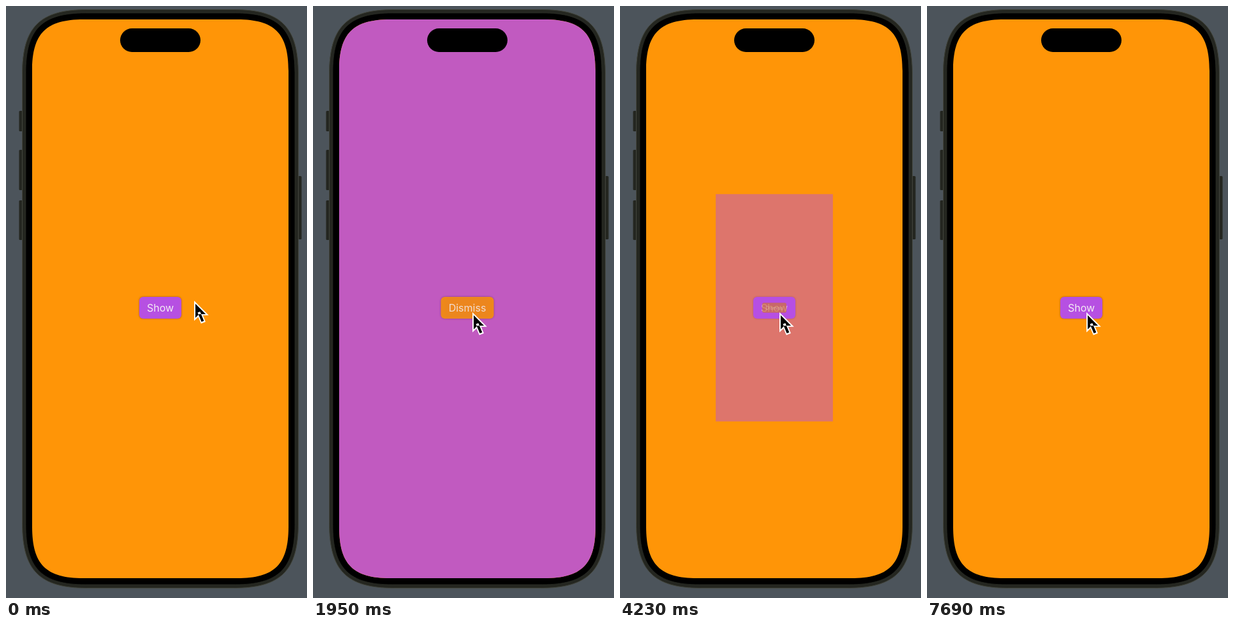
An HTML page for the animation above (7710 ms loop, 472 by 926 pixels).

```html
<!DOCTYPE html>
<html lang="en">
<head>
<meta charset="utf-8">
<title>Show and dismiss</title>
<style>
  html, body { margin: 0; width: 100%; height: 100%; overflow: hidden; background: #4c545b; }
  svg { display: block; width: 472px; height: 926px; }
  text { font: 16px Inter, Roboto, sans-serif; fill: #f3ecf3; text-anchor: middle; }
  .button { filter: drop-shadow(0 0 1.5px rgba(0, 0, 0, .35)); }
</style>
</head>
<body>
<svg viewBox="0 0 472 926">
  <defs><clipPath id="clip"><path id="screen"/></clipPath></defs>
  <g fill="#242620">
    <rect x="20.5" y="164" width="8" height="32" rx="1.5"/>
    <rect x="20.5" y="225" width="8" height="63" rx="1.5"/>
    <rect x="20.5" y="304" width="8" height="62" rx="1.5"/>
    <rect x="455" y="266" width="8.5" height="99" rx="1.5"/>
    <path id="shell" stroke="#42453c"/>
  </g>
  <path id="bezel" stroke="#30332a" stroke-width=".6"/>
  <g clip-path="url(#clip)">
    <rect x="41" y="21" width="402" height="874" fill="#ff9507"/>
    <g id="show">
      <rect class="button" x="209" y="455" width="66" height="34" rx="6" fill="#b650e2"/>
      <text x="242" y="478">Show</text>
    </g>
    <g id="sheet">
      <rect id="fill" x="41" width="402" fill="#b650e2"/>
      <g id="dismiss">
        <rect class="button" x="200.5" y="455" width="83" height="34" rx="6" fill="#ff9507"/>
        <text x="242" y="478">Dismiss</text>
      </g>
    </g>
  </g>
  <rect x="179" y="35" width="126" height="37" rx="18.5"/>
  <g id="cursor">
    <path fill="#fff" d="M0 0L11.6 11.6H4.8L0 16ZM9.1 16.7L5.5 18.2L.8 7.1L4.5 5.6Z"/>
    <path d="M1 2.4V13.6L4 10.7L4.4 10.6H9.2ZM2.8 9.4L4.7 8.6L7.8 16L5.9 16.8Z"/>
  </g>
</svg>
<script>
const LOOP = 7710, FADE = 20;      // FADE is counted in ticks
const SHOW_AT = 10.4, DISMISS_AT = 64.5;
const $ = id => document.getElementById(id);
const set = (id, attrs) => {
  for (const key in attrs) $(id).setAttribute(key, attrs[key]);
};
const clamp = v => Math.min(1, Math.max(0, v));

// Rectangle with continuous-curvature corners
function squircle(x, y, w, h, r) {
  const e = 1.3 * r, c = .35 * r, f = e - c;
  return `M${x + e} ${y}h${w - 2 * e}c${f} 0 ${e} ${c} ${e} ${e}` +
    `v${h - 2 * e}c0 ${f} ${-c} ${e} ${-e} ${e}` +
    `h${2 * e - w}c${-f} 0 ${-e} ${-c} ${-e} ${-e}` +
    `v${2 * e - h}c0 ${-f} ${c} ${-e} ${e} ${-e}z`;
}

// cubic-bezier(.42, 0, .58, 1)
function easeInOut(x) {
  x = clamp(x);
  let lo = 0, hi = 1;
  for (let i = 0; i < 20; i++) {
    const s = (lo + hi) / 2, r = 1 - s;
    if (1.26 * r * r * s + 1.74 * r * s * s + s ** 3 < x) lo = s; else hi = s;
  }
  return lo * lo * (3 - 2 * lo);
}

function tickAt(ms) {
  const u = ms + 110, r = u % 140;
  return 3 * Math.floor(u / 140) + (r >= 100) + (r >= 120) - 18;
}

// Button opacity dips slightly around a tap
const pressed = (n, tap) =>
  1 - .08 * Math.min(clamp((n - tap + 2) / 1.5), clamp((tap + 4 - n) / 3.5));

function draw() {
  const n = tickAt(performance.now() % LOOP);
  const shown = easeInOut((n - SHOW_AT) / FADE);
  const scale = 1 - easeInOut((n - DISMISS_AT) / FADE);
  const full = n <= DISMISS_AT;
  const away = 1 - easeInOut((n + 12) / 16);

  set('show', { opacity: pressed(n, SHOW_AT) });
  set('dismiss', { opacity: pressed(n, DISMISS_AT) });
  // The fill reaches past the safe area only while unscaled
  set('fill', full ? { y: 21, height: 874 } : { y: 83, height: 778 });
  // Inherited fill-opacity fades each layer of the sheet on its own
  set('sheet', {
    'fill-opacity': shown * scale,
    transform: `translate(242 472) scale(${scale}) translate(-242 -472)`
  });
  set('cursor', { transform: `translate(${250 + 45 * away} ${479 - 18 * away}) scale(1.97)` });
  requestAnimationFrame(draw);
}

set('shell', { d: squircle(25.5, 5.5, 433, 905, 78) });
set('bezel', { d: squircle(31, 11, 422, 894, 72) });
set('screen', { d: squircle(41, 21, 402, 874, 62) });
draw();
</script>
</body>
</html>
```
